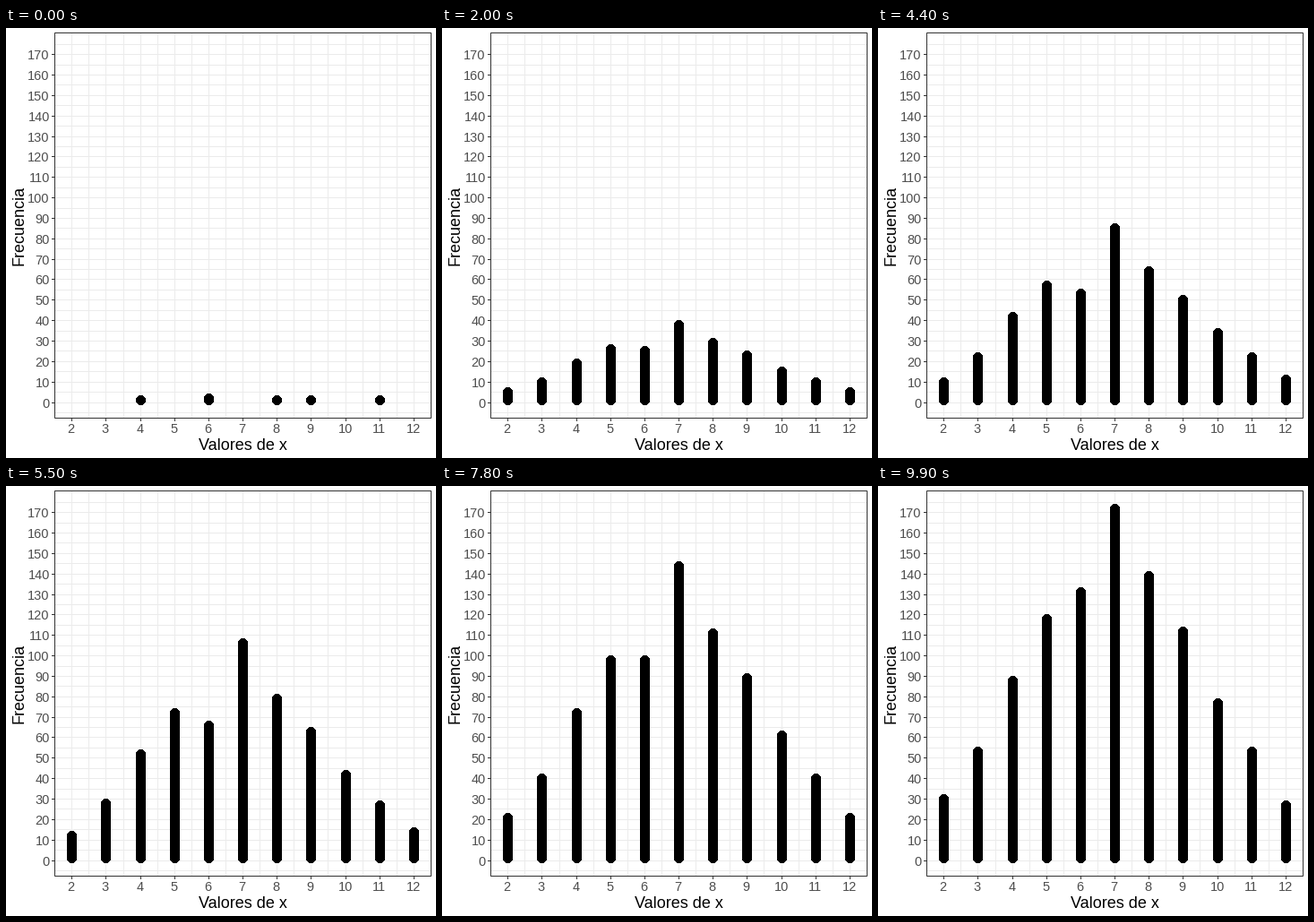
Recreate the animation shown at these times as a matplotlib script. Size 480x480 px, loop 10 s.

```python
import numpy as np
import matplotlib.pyplot as plt
from matplotlib.animation import FuncAnimation
from matplotlib.patches import Polygon, Rectangle

SIZE, DPI, FRAMES = 480, 100, 100
PX = 72 / DPI
THROWS = 1000
RADIUS = 4.9  # without antialiasing this fills a dot 11 pixels wide
LEFT, TOP, RIGHT, BOTTOM = 54.5, 5.5, 474.5, 435.5
GRID, AXIS, LABEL = "#ebebeb", "#333333", "#4d4d4d"
SUMS = range(2, 13)

plt.rcParams["font.family"] = ["Liberation Sans", "DejaVu Sans"]

# Column heights at the start, two thirds through and at the end
KEYS = np.array([
    [0, 0, 1, 0, 2, 0, 1, 1, 0, 1, 0],
    [15, 33, 62, 86, 79, 127, 95, 75, 51, 32, 17],
    [30, 53, 88, 118, 131, 172, 139, 112, 77, 53, 27],
])
KEY_THROWS = KEYS.sum(axis=1)


def x_pos(value):
    return np.floor(73.82 + 38.15 * (value - 2)) + 0.5


def y_pos(value):
    return np.floor(418.05 - 2.2844 * value) + 0.5


def capsule(x, count):
    """Outline of a stack of dots from 1 to count."""
    arc = np.linspace(0, np.pi, 40)
    dx, dy = RADIUS * np.cos(arc), RADIUS * np.sin(arc)
    upper = np.column_stack([x + dx, y_pos(count) - dy])
    lower = np.column_stack([x - dx, y_pos(1) + dy])
    return np.vstack([upper, lower])


fig = plt.figure(figsize=(SIZE / DPI, SIZE / DPI), dpi=DPI, facecolor="white")
ax = fig.add_axes([0, 0, 1, 1])
ax.set(xlim=(0, SIZE), ylim=(SIZE, 0))
ax.axis("off")


def line(xs, ys, color, z):
    ax.plot(xs, ys, color=color, lw=PX, snap=False,
            solid_capstyle="butt", zorder=z)


def text(x, y, s, size, color, ha="center", **kw):
    ax.text(x, y, s, fontsize=size * PX, color=color, ha=ha, va="baseline", **kw)


for v in np.arange(2, 12.1, 0.5):
    line([x_pos(v)] * 2, [TOP, BOTTOM], GRID, 1)
for v in range(-5, 180, 5):
    line([LEFT, RIGHT], [y_pos(v)] * 2, GRID, 1)

ax.add_patch(Rectangle((LEFT, TOP), RIGHT - LEFT, BOTTOM - TOP, fill=False,
                       ec=AXIS, lw=PX, snap=False, zorder=4))

for v in SUMS:
    line([x_pos(v)] * 2, [BOTTOM, BOTTOM + 3.5], AXIS, 3)
    text(x_pos(v) - 0.7, 452, str(v), 14.5, LABEL)
for v in range(0, 180, 10):
    line([LEFT - 3.5, LEFT], [y_pos(v)] * 2, AXIS, 3)
    text(48.7, y_pos(v) + 5.5, str(v), 14.5, LABEL, ha="right")

text(264, 471, "Valores de x", 18, "black")
text(20, 220, "Frecuencia", 18, "black", rotation=90, rotation_mode="anchor")

stacks = [ax.add_patch(Polygon(capsule(x_pos(v), 1), fc="black", ec="none", lw=0,
                               antialiased=False, snap=False, zorder=2))
          for v in SUMS]


def update(k):
    thrown = min(THROWS, 1 + int((k + 0.5) * (THROWS - 1) / (FRAMES - 1)))
    for stack, v, heights in zip(stacks, SUMS, KEYS.T):
        count = round(np.interp(thrown, KEY_THROWS, heights))
        stack.set_visible(count > 0)
        stack.set_xy(capsule(x_pos(v), max(count, 1)))
    return stacks


anim = FuncAnimation(fig, update, frames=FRAMES, interval=100,
                     repeat=True, repeat_delay=0, blit=False)
plt.show()
```
